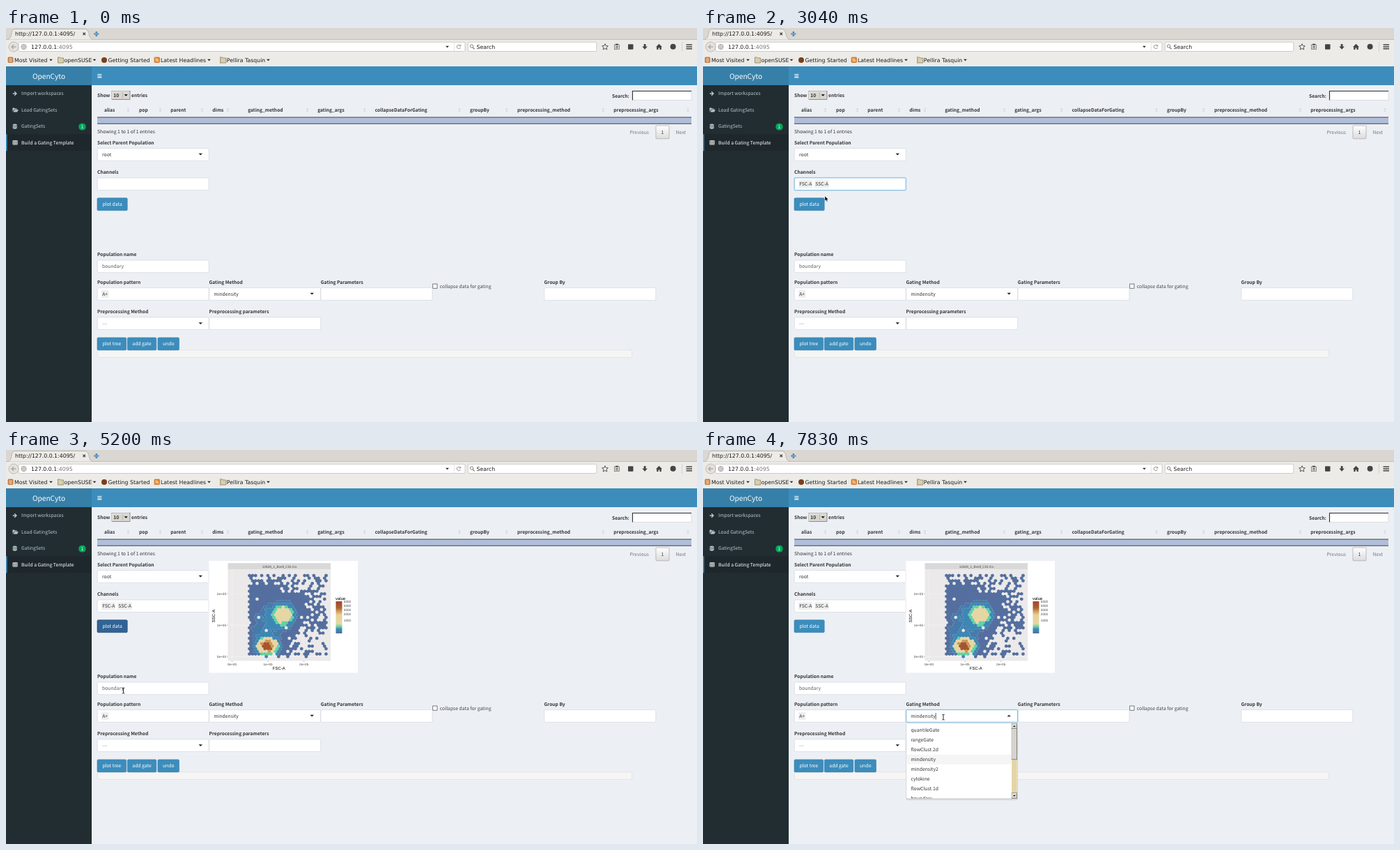
An HTML page for the animation above (8000 ms loop, 992 px wide and 565 px high).

```html
<!DOCTYPE html>
<html lang="en">
<head>
<meta charset="utf-8">
<title>Gating template</title>
<style>
html, body { margin: 0; width: 100%; height: 100%; overflow: hidden; background: #ecf0f5; }
svg { display: block; width: 992px; height: 565px; }
text { font: 6.8px "Noto Sans CJK JP", "Noto Sans CJK SC", "Noto Sans CJK", "Open Sans", sans-serif; fill: #333; white-space: pre; text-rendering: geometricPrecision; }
.bold { font-size: 6.7px; font-weight: 700; }
.mid { text-anchor: middle; }
.end { text-anchor: end; }
.white { fill: #fff; }
.gray { fill: #777; }
.side { fill: #b8c7ce; }
.logo { font-size: 10.2px; fill: #fff; text-anchor: middle; }
.chrome { font: 7.8px "DejaVu Sans", sans-serif; fill: #1a1a1a; }
.axis { font: 4.7px "Liberation Sans", sans-serif; fill: #444; }
.title { font: 6px "Liberation Sans", sans-serif; fill: #000; }
</style>
</head>
<body>
<svg id="stage" viewBox="0 0 992 565"></svg>
<script>
const stage = document.getElementById('stage');
const rect = (x, y, w, h, fill, stroke = 'none', r = 0) =>
  `<rect x="${x}" y="${y}" width="${w}" height="${h}" fill="${fill}" stroke="${stroke}" stroke-width=".6" rx="${r}"/>`;
const text = (x, y, s, cls = '') => `<text x="${x}" y="${y}" class="${cls}">${s}</text>`;
const path = (d, fill, stroke = 'none', width = 1) =>
  `<path d="${d}" fill="${fill}" stroke="${stroke}" stroke-width="${width}"/>`;
const circle = (x, y, r, fill, stroke = 'none') => `<circle cx="${x}" cy="${y}" r="${r}" fill="${fill}" stroke="${stroke}" stroke-width=".8"/>`;
const group = (id, body) => `<g id="${id}">${body}</g>`;
const down = (x, y, w = 2.7, c = '#222') => path(`M${x - w} ${y - w / 2}h${2 * w}l${-w} ${w}z`, c);
const up = (x, y, w = 2.7, c = '#222') => path(`M${x - w} ${y + w / 2}h${2 * w}l${-w} ${-w}z`, c);
const label = (x, y, s) => text(x, y, s, 'bold');
const field = (x, y) => rect(x, y, 160, 17.7, '#fff', '#cdd1d8', 1.2);
const tag = (x, y, w, s) => rect(x, y - 8, w, 11, '#efefef', 'none', 1) + text(x + 1.2, y, s);
const button = (x, y, w, s) => rect(x, y, w, 18, '#3c8dbc', '#367fa9', 1.5) + text(x + w / 2, y + 11.5, s, 'mid white');
const glow = (x, y) => rect(x - .8, y - .8, 161.6, 19.3, 'none', '#b9dcef', 2) + rect(x, y, 160, 17.7, 'none', '#4fa3d8', 1.2);

function browser() {
  const folder = x => path(`M${x} 42h3l1 1h4v7h-8z`, '#d8cfae', '#7d7556', .7);
  const dark = '#444';
  let s = rect(0, 0, 992, 55, '#edebe7') + rect(0, 0, 992, 16.5, '#dad7d2') + rect(0, 16, 992, .7, '#b5b1aa');
  s += path('M2 16.5Q7 16 8 8Q8.500 1.500 13 1.500H113Q118 1.500 119 8Q120 16 125 16.500', '#edebe7', '#aaa69f', .7);
  s += text(13, 11.2, 'http://127.0.0.1:4095/', 'chrome') + path('M110.500 6.700l3.500 3.500m0-3.500l-3.500 3.500', 'none', '#333', 1.2);
  s += path('M129.800 5v7m-3.500-3.500h7', 'none', '#2f6ca8', 2.2) + path('M129.800 5.500v6m-3-3h6', 'none', '#8cb9e2', .8);
  s += rect(18, 20.3, 641, 13.2, '#fff', '#b3afa8', 1.5) + rect(663.3, 20.3, 184.5, 13.2, '#fff', '#b3afa8', 1.5);
  s += circle(11, 27, 7, '#e6e3de', '#b3afa8') + path('M14.500 27h-6.500m3-3l-3 3l3 3', 'none', '#aaa', 1.4);
  s += circle(25.5, 27, 3.6, '#eee', '#888') + path('M22 27h7M25.500 23.500q-3 3.500 0 7q3-3.500 0-7', 'none', '#999', .6);
  s += text(36, 29.7, '127.0.0.1<tspan fill="#777">:4095</tspan>', 'chrome') + down(633.5, 27, 2.4);
  s += rect(643, 21, .5, 12, '#ccc') + path('M652.300 25.500a2.700 2.700 0 1 0 .2 2.500m.2-4v2h-2', 'none', '#777', .8);
  s += circle(668.6, 26, 2.2, 'none', '#666') + path('M670.200 27.800l2.300 2.500', 'none', '#666', 1.1) + text(675.5, 29.7, 'Search', 'chrome');
  s += path('M860 22.700l1.300 2.800l3 .3l-2.200 2.100l.6 3l-2.700-1.500l-2.700 1.500l.6-3l-2.200-2.100l3-.3z', 'none', dark, .9);
  s += rect(873.5, 24, 7, 6.6, '#edebe7', dark) + rect(875, 22.7, 4, 1.8, dark) + path('M875 26.500h4m-4 2h4', 'none', dark, .9);
  s += rect(893, 23.3, 7.5, 7.5, dark, 'none', 1);
  s += path('M915.700 23h2.800v3.500h2.400l-3.800 4.300l-3.800-4.300h2.400z', dark);
  s += path('M933 27.300l4.500-4.500l4.500 4.500h-1.200v3.700h-2.300v-2.500h-2v2.500h-2.300v-3.700z', dark);
  s += circle(957.6, 26.8, 4, dark) + rect(970.3, 20, .6, 14, '#c5c1bb');
  s += path('M976.500 24h8.500m-8.500 2.900h8.500m-8.500 2.900h8.500', 'none', dark, 1.5);
  s += rect(3, 42, 7, 7.5, '#d58a4b', '#94501f', 1) + path('M4.500 44h4m-4 2h4m-4 2h4', 'none', '#fff', .6);
  s += text(12, 48.6, 'Most Visited', 'chrome') + down(64.5, 46, 2.4);
  s += folder(74.5) + text(83.5, 48.6, 'openSUSE', 'chrome') + down(127, 46, 2.4);
  s += circle(141, 46, 4, '#79401f') + text(146.5, 48.6, 'Getting Started', 'chrome');
  s += rect(213, 42, 7.5, 7.5, '#e58b35', '#b96012', 1) + path('M214.500 44q4 0 4 4m-4-2q2 0 2 2', 'none', '#fff', .8);
  s += text(222, 48.6, 'Latest Headlines', 'chrome') + down(291.5, 46, 2.4) + rect(307, 40, .6, 12, '#bbb7b0');
  s += folder(307.8) + text(316.8, 48.6, 'Pellira Tasquin', 'chrome') + down(376.5, 46, 2.4);
  return s;
}

function sidebar() {
  const c = '#b8c7ce';
  let s = rect(0, 55, 992, 27, '#3c8dbc') + rect(0, 55, 123, 27, '#367fa9') + rect(0, 82, 123, 483, '#222d32');
  s += rect(0, 152.3, 123, 24, '#1e282c') + rect(0, 152.3, 1.6, 24, '#3c8dbc');
  s += text(61.5, 73, 'OpenCyto', 'logo') + path('M131.300 66.500h6m-6 2.200h6m-6 2.200h6', 'none', '#fff', 1.1);
  s += path('M9.700 94h5m-2.500-2.800l2.800 2.800l-2.800 2.800', 'none', c, 1.4);
  s += path('M9.500 120v-5.500h2.500l.8 1h3v1.200h-4z M10.300 120.500l2-3.200h5.700l-2 3.200z', c);
  s += path('M9.700 138.300q3-1.800 6 0v5.500q-3 1.800-6 0z', c) + path('M9.700 139.500q3 1.400 6 0m-6 2.100q3 1.400 6 0', 'none', '#222d32', .6);
  s += rect(9.8, 161.5, 6.6, 5.8, 'none', '#fff', .5) + path('M9.800 162.200h6.600m-6.600 1.900h6.600m-6.600 1.700h6.600M12 162v5m2.200-5v5', 'none', '#fff', .7);
  ['Import workspaces', 'Load GatingSets', 'GatingSets', 'Build a Gating Template'].forEach((name, i) =>
    s += text(22, 96.4 + 23.5 * i, name, i == 3 ? 'white' : 'side'));
  return s + rect(104.3, 136.7, 10.4, 9.8, '#00a65a', 'none', 4.5) + text(109.5, 143.8, '1', 'mid white');
}

function table() {
  let s = label(131, 99.2, 'Show') + label(180, 99.2, 'entries') + label(870, 99.7, 'Search:');
  s += rect(152, 90.5, 26, 12, '#d9d6d0', '#555') + path('M152.500 102V91H177', 'none', '#fff', .7) + rect(167, 92, .5, 9, '#999');
  s += label(154.3, 99.3, '10') + down(172.2, 96.5, 2.6, '#000');
  s += rect(899, 90, 85, 13.5, '#fff', '#ccc') + path('M899.500 103.500V90.500H984', 'none', '#333', 1.1);
  const columns = [['alias', 141, 175.5], ['pop', 191, 221.5], ['parent', 236.3, 281.5], ['dims', 296.3, 318.7],
    ['gating_method', 347.2, 432.5], ['gating_args', 447.2, 514.7], ['collapseDataForGating', 529.8, 651],
    ['groupBy', 666, 718.8], ['preprocessing_method', 734, 857.3], ['preprocessing_args', 872.3, 979]];
  for (const [name, x, sort] of columns)
    s += label(x, 120, name) + up(sort, 115.8, 2, '#cdd2da') + down(sort, 119.6, 2, '#cdd2da');
  s += rect(131, 128, 853, 9.3, '#b0bed9') + rect(131, 127.6, 853, .8, '#222') + rect(131, 136.8, 853, .8, '#222');
  s += text(131, 151.4, 'Showing 1 to 1 of 1 entries') + text(895.5, 152, 'Previous', 'gray') + text(961.5, 152, 'Next', 'gray');
  return s + rect(933, 140, 19, 18.8, 'url(#page)', '#979797', 1) + text(942.5, 152, '1', 'mid');
}

function form() {
  let s = label(131, 166.8, 'Select Parent Population') + field(131.2, 172.6) + text(138, 184, 'root') + down(279.3, 181.2);
  s += label(131, 209, 'Channels') + field(131.2, 214.9);
  s += label(131, 327.4, 'Population name') + field(131.2, 333) + `<text x="138" y="344.400" fill-opacity=".8">boundary</text>`;
  s += label(131, 367.2, 'Population pattern') + label(291.5, 367.2, 'Gating Method') + label(451.8, 367.2, 'Gating Parameters') + label(772.5, 367.2, 'Group By');
  for (const x of [131.2, 291.7, 452, 772.8]) s += field(x, 372.6);
  s += tag(137, 384, 10.5, 'A+') + text(298.3, 384, 'mindensity');
  s += rect(612.8, 367, 6.2, 6.2, '#fff', '#222') + `<text x="622.800" y="372.500" fill-opacity=".9">collapse data for gating</text>`;
  s += label(131, 409.3, 'Preprocessing Method') + label(291.5, 409.3, 'Preprocessing parameters');
  s += field(131.2, 414.9) + field(291.7, 414.9) + text(138, 426.2, '---', 'gray') + down(279.3, 423.6);
  s += rect(131.2, 461.7, 767.5, 10.7, '#f5f5f5', '#d8d8d8', 1.5);
  return s + button(131, 443.9, 41.7, 'plot tree') + button(174.3, 443.9, 41.5, 'add gate') + button(217.9, 443.9, 30.6, 'undo');
}

function hexPlot() {
  const shades = [[3000, '#a5562f'], [2000, '#cf9650'], [550, '#e6d6a4'], [300, '#5fd3a6'], [105, '#3d87b5'], [60, '#467aaa'], [0, '#546f9f']];
  const paths = shades.map(() => '');
  let seed = 11;
  const random = () => (seed = seed * 16807 % 2147483647) / 2147483647;
  const bump = (x, y, cx, cy, sx, sy) => Math.exp(-(((x - cx) / sx) ** 2 + ((y - cy) / sy) ** 2) / 2);
  const fill = (x, y) => {
    if (y < 184) return .45;
    if (y < 195) return x < 400 ? .65 : .48;
    if (y > 294) return x < 378 ? .3 : .06;
    const limit = y < 205 ? 395 : y < 240 ? 430 : 430 - (y - 240) * .55;
    return x < limit ? .97 : y < 262 ? .55 : x < 432 ? .4 : .2;
  };
  const hex = (x, y) => `M${x.toFixed(2)} ${(y - 2.6).toFixed(2)}l2.250 1.300v2.600l-2.250 1.300l-2.250-1.300v-2.600z`;
  for (let row = 0; row < 32; row++)
    for (let x = 349.5 + row % 2 * 2.2; x < 461; x += 4.4) {
      const y = 180 + row * 3.75, jitter = .75 + random() * .5;
      if (random() > fill(x, y)) continue;
      const density = jitter * (4800 * bump(x, y, 375.5, 281, 7, 5.5) + 1300 * bump(x, y, 398, 237, 8, 8.2)
        + 130 * bump(x, y, 373, 259, 15, 18) + 90 * bump(x, y, 390, 232, 18, 9));
      paths[shades.findIndex(([min]) => density >= min)] += hex(x, y);
    }
  paths[3] += hex(459.7, 180);
  let s = rect(291.5, 159, 213.5, 160.5, '#fff') + rect(318.5, 162.2, 147.7, 9.3, '#d9d9d9') + rect(318.5, 171.5, 147.7, 130.8, '#ebe9e9');
  s += path('M324.500 172v130m51.500 0v-130m51.700 0v130M318.500 206h147.700m0 45.200h-147.700m0 45h147.700', 'none', '#f7f7f7', .5);
  paths.forEach((d, i) => s += path(d, shades[i][1]));
  s += text(392.5, 168.7, '12828_1_Bcell_C01.fcs', 'axis mid');
  ['0e+00', '1e+05', '2e+05'].forEach((name, i) => {
    const x = 324.5 + 51.6 * i, y = 296.2 - 45.1 * i;
    s += text(x, 308.7, name, 'axis mid') + text(316, y + 1.6, name, 'axis end');
    s += path(`M${x} 302.300v1.400M317 ${y}h1.500`, 'none', '#555', .5);
  });
  s += text(391.8, 315.2, 'FSC-A', 'title mid') + `<text class="title mid" transform="translate(300 238) rotate(-90)">SSC-A</text>`;
  s += text(473, 214.7, 'value', 'title') + rect(473.5, 217, 9, 46, 'url(#scale)');
  [219.3, 225.2, 231, 237, 246].forEach((y, i) => s += text(484.8, y, 5000 - 1000 * i, 'axis'));
  return s;
}

function dropdown(x, y, items, active) {
  const bevel = (top, h) => rect(x + 151.5, top, 7.5, h, '#d6d3ce', '#555') + path(`M${x + 152} ${top + h - .5}v${1 - h}h6.500`, 'none', '#fff', .6);
  let s = rect(x - .5, y + 1.5, 161, 109, 'rgba(0,0,0,.1)', 'none', 2) + rect(x, y, 159.5, 108, '#fff', '#c8ccd2', 1);
  s += `<svg x="${x}" y="${y}" width="151" height="107.700">`;
  items.forEach((name, i) => {
    if (i == active) s += rect(.4, 3.3 + 13.9 * i, 151, 13.9, '#f5f5f5');
    s += text(6.7, 12.7 + 13.9 * i, name);
  });
  s += '</svg>' + rect(x + 151.5, y, 7.5, 108, '#e3d5a4') + bevel(y + .5, 7.5) + bevel(y + 8, 44) + bevel(y + 100, 7.5);
  return s + up(x + 155.2, y + 4.3, 1.8, '#000') + down(x + 155.2, y + 104, 1.8, '#000');
}

const channels = ['FSC-A', 'SSC-A', 'Live', 'CD3', 'CD19', 'CD20', 'IgD', 'CD27', 'CD38'];
const methods = ['quantileGate', 'rangeGate', 'flowClust.2d', 'mindensity', 'mindensity2', 'cytokine', 'flowClust.1d', 'boundary'];

stage.innerHTML = `<defs>
<linearGradient id="page" x2="0" y2="1"><stop stop-color="#fff"/><stop offset="1" stop-color="#dcdcdc"/></linearGradient>
<linearGradient id="scale" x2="0" y2="1"><stop stop-color="#9c4a2b"/><stop offset=".2" stop-color="#ab5f35"/><stop offset=".3" stop-color="#cf9650"/>
<stop offset=".42" stop-color="#e6d09a"/><stop offset=".7" stop-color="#e6d6a4"/><stop offset=".79" stop-color="#5fd3a6"/><stop offset=".87" stop-color="#3d87b5"/><stop offset="1" stop-color="#546f9f"/></linearGradient></defs>`
  + browser() + sidebar() + table() + form()
  + group('plotButton', button(131, 243.7, 43.2, 'plot data'))
  + group('plot', hexPlot())
  + group('channelFocus', glow(131.2, 214.9))
  + group('channelCaret', rect(137.8, 219, .7, 9.5, '#222'))
  + group('firstTag', tag(137, 226.3, 20, 'FSC-A'))
  + group('secondTag', tag(160, 226.3, 20.5, 'SSC-A'))
  + group('allChannels', dropdown(131.2, 234, channels, 0))
  + group('otherChannels', dropdown(131.2, 234, channels.slice(1), 0))
  + group('methodClosed', down(439.3, 381.2))
  + group('methodOpen', glow(291.7, 372.6) + up(439.3, 381) + rect(333.8, 377, .7, 9.5, '#222') + dropdown(291.7, 391.8, methods, 3))
  + group('arrow', path('M0 0v7l1.600-1.500l1.200 2.600l1.200-.6l-1.200-2.400h2.200z', '#000', '#fff', .4))
  + group('beam', path('M-1.700-3.800q1.700 0 1.700.8q0-.8 1.700-.8M0-3v6.200M-1.700 4q1.700 0 1.700-.8q0 .8 1.700.8', 'none', '#111', .9))
  + group('hand', path('M-.8-.5q.8-.9 1.600 0v2.600l3 .7q.8.300.6 1.200l-.7 2.800h-3.700l-2.600-3.300q0-1.200 1.800-.2z', '#222', '#fff', .8));

const parts = Object.fromEntries([...stage.querySelectorAll('g')].map(g => [g.id, g]));
const buttonFace = parts.plotButton.querySelector('rect');
const show = (id, on) => parts[id].style.display = on ? '' : 'none';

// Pointer stops: time, x, y
const stops = [[620, 187, 233], [780, 181, 239], [970, 181, 239], [1270, 182, 232], [2120, 182, 232], [2280, 175, 241],
  [3280, 175, 241], [3490, 165, 252.5], [4560, 165, 252.5], [4720, 174, 266], [4900, 178, 295], [5200, 168.5, 345], [5360, 170, 346],
  [5400, 170, 346], [5900, 169, 380], [6140, 169, 372.7], [6280, 169, 372.7], [6720, 168, 377], [6870, 168, 377],
  [7400, 343, 384], [7540, 344, 383], [7790, 344, 383], [7830, 345, 383]];

function pointerAt(t) {
  const next = stops.findIndex(stop => stop[0] > t);
  if (next < 1) return stops[next < 0 ? stops.length - 1 : 0].slice(1);
  const [t0, x0, y0] = stops[next - 1], [t1, x1, y1] = stops[next];
  const k = (t - t0) / (t1 - t0);
  return [x0 + (x1 - x0) * k, y0 + (y1 - y0) * k];
}

function draw() {
  const t = performance.now() % 8000;
  const within = (from, to = 8000) => t >= from && t < to;
  const [x, y] = pointerAt(t);
  const hover = x > 131 && x < 174.5 && y > 243.5 && y < 262;
  const inField = [214.9, 333, 372.6].some(top => y >= top && y <= top + 17.8) && !within(620, 970);
  const kind = hover ? 'hand' : inField ? 'beam' : 'arrow';
  for (const id of ['arrow', 'beam', 'hand']) {
    show(id, t >= 620 && id == kind);
    parts[id].setAttribute('transform', `translate(${x} ${y})`);
  }
  const [face, edge] = within(3640, 3780) ? ['#204d74', '#122b40']
    : hover ? ['#367fa9', '#204d74']
    : within(3780, 7480) ? ['#306496', '#1b3f5f'] : ['#3c8dbc', '#367fa9'];
  buttonFace.setAttribute('fill', face);
  buttonFace.setAttribute('stroke', edge);
  show('channelCaret', within(1760, 2500));
  show('channelFocus', within(1840, 3640));
  show('allChannels', within(1840, 2500));
  show('otherChannels', within(2500, 2950));
  show('firstTag', within(2500));
  show('secondTag', within(2910));
  show('plot', within(4280));
  show('methodOpen', within(7480));
  show('methodClosed', t < 7480);
  requestAnimationFrame(draw);
}
draw();
</script>
</body>
</html>
```
